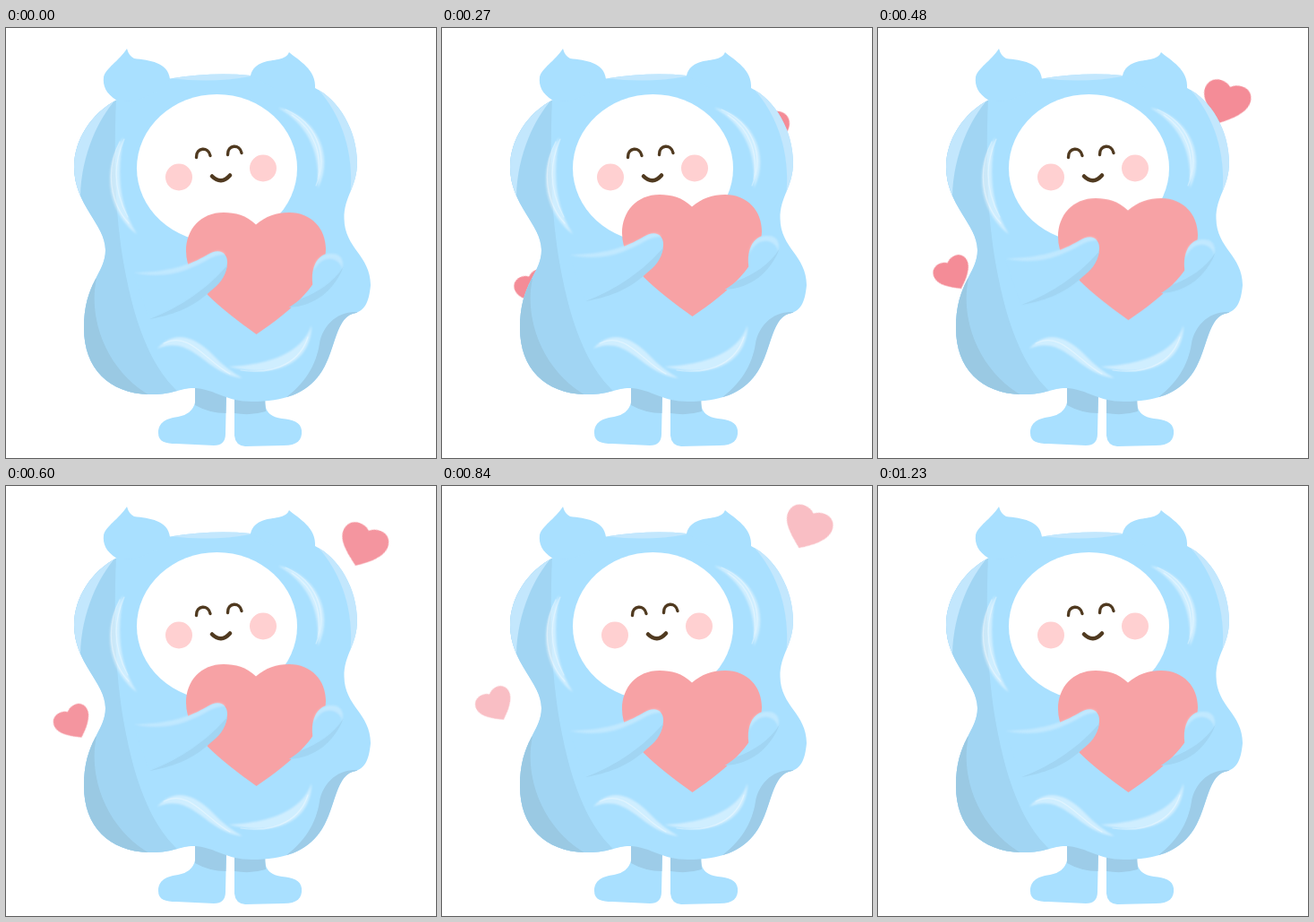
An HTML page for the animation above (1.5 s loop, 480 by 480 pixels).

```html
<!DOCTYPE html>
<html lang="en">
<head>
<meta charset="utf-8">
<title>Hug</title>
<style>
html, body { margin: 0; width: 100%; height: 100%; overflow: hidden; background: #fff; }
svg { display: block; width: 100vw; height: 100vh; }
.hug, .face, .drift { animation: 1500ms linear infinite; }
.drift { fill: #f48c97; }
.hug { animation-name: hug; }
.face { animation-name: face; }
.left { animation-name: left; }
.right { animation-name: right; }
@keyframes hug {
  0%, 46.5%, 100% { transform: translateY(0); }
  10% { transform: translateY(-11px); }
  18% { transform: translateY(-20px); }
  22%, 25% { transform: translateY(-22.5px); }
  32% { transform: translateY(-16px); }
}
@keyframes face {
  0%, 30%, 100% { transform: translateX(0); }
  8%, 22% { transform: translateX(-5px); }
}
@keyframes left {
  0% { transform: translate(144px, 324px) rotate(-22deg); }
  10% { transform: translate(133px, 318px) rotate(-24deg); }
  18% { transform: translate(111px, 307px) rotate(-25deg); }
  32% { transform: translate(93px, 291px) rotate(-28deg); }
  36.7% { opacity: 1; }
  48% { transform: translate(76px, 270.5px) rotate(-29deg); }
  66% { transform: translate(60px, 249px) rotate(-29deg); }
  82%, 100% { transform: translate(52px, 237px) rotate(-29deg); opacity: 0; }
}
@keyframes right {
  0% { transform: translate(322px, 164px) rotate(8deg); }
  10% { transform: translate(334px, 154px) rotate(10deg); }
  18% { transform: translate(355px, 136px) rotate(12deg); }
  32% { transform: translate(381px, 106px) rotate(17deg); }
  36.7% { opacity: 1; }
  40% { transform: translate(390px, 89px) rotate(21deg); }
  48% { transform: translate(396px, 75px) rotate(23deg); }
  66% { transform: translate(401.5px, 62px) rotate(23deg); }
  82%, 100% { transform: translate(403px, 58px) rotate(23deg); opacity: 0; }
}
.blue { fill: #a9e0ff; }
.pale { fill: #c3e7fd; }
.dim { fill: #a1d5f3; }
.dark { fill: #9ac9e3; }
.shade { fill: #9dcce8; }
.blush { fill: #ffd0d1; }
.shine { fill: #fff; opacity: .45; filter: url(#soft); }
.faint { opacity: .28; }
.wisp { fill: none; stroke: #fff; stroke-width: 1.2; stroke-linecap: round; opacity: .35; }
.ink { fill: none; stroke: #503a20; stroke-width: 3.4; stroke-linecap: round; }
.smile { stroke-width: 4.5; }
</style>
</head>
<body>
<svg viewBox="0 0 480 480">
  <defs>
    <filter id="soft" x="-20%" y="-20%" width="140%" height="140%"><feGaussianBlur stdDeviation="1.2"/></filter>
    <path id="heart" d="M279 219.500C268 209 256 206 243 206C217 206 201 225 201 249C201 285 240 313 279.500 342C318 316 357 283 357 247C357 224 341 206 316 206C302 206 290 210 279 219.500Z"/>
    <path id="body" d="M124 80C118 58 160 54 183 56.500Q230 49 273 53C300 45 340 52 345 67C372 80 392 115 392 150C392 178 377 188 377.500 213C378 246 407 254 407 287C405 308 400 316 387 319C367 325 367 365 350 387C335 408 310 417 275 417C245 417 235 404 212 402C195 401 185 410 160 409C115 408 87 380 87 335C87 284 111 274 111 248C111 219 76 198 76 155C76 125 95 95 124 80Z"/>
    <clipPath id="inside"><use href="#body"/></clipPath>
  </defs>

  <g class="drift left"><use href="#heart" transform="scale(.265) translate(-279.500 -342)"/></g>
  <g class="drift right"><use href="#heart" transform="scale(.34) translate(-279.500 -342)"/></g>

  <g class="blue">
    <path d="M211 398V418Q208 431 192 434C175 436 170 443 170 452C170 462 178 464 190 464L232 466Q245 466 245 453L246 408Z"/>
    <path d="M255 410V455Q256 466 267 467L310 466C325 466 331 460 330 449C329 440 320 437 308 436Q291 434 289 420V410Z"/>
  </g>
  <path class="shade" d="M211 398V421Q227 430 245.500 430L246 408ZM255 410V430Q274 433 290 428L289 410Z"/>

  <use href="#body" class="blue"/>
  <g clip-path="url(#inside)">
    <path class="dim" d="M123 78C119 180 124 250 146 325C158 362 172 387 192 406L160 420L60 400V60Z"/>
    <path class="pale" d="M124 78C104 100 84 140 83 188L60 190V70Z"/>
    <path class="pale" d="M345 65C372 92 392 140 383 194L410 180V60Z"/>
    <path class="pale" d="M183 56Q230 62 273 54V40H183Z"/>
    <path class="dark" d="M101 280C91 325 113 385 164 412L70 420V280Z"/>
    <path class="shade" d="M392 317C368 316 353 334 350 352C346 377 334 397 308 416L400 420Z"/>
  </g>
  <g class="blue">
    <path d="M124 81C111 73 108 64 109 55C111 45 126 37 135 23Q137 31 143 34C160 36 181 38 183 57Q170 75 140 82Z"/>
    <path d="M273 53C277 37 294 37 304 35Q314 33 316 27C326 36 347 46 345 68L300 68Z"/>
  </g>

  <g class="shine">
    <path d="M131 122C106 157 113 205 146 230C127 200 123 165 131 122Z"/>
    <path d="M304 89C344 97 368 140 348 179C351 145 341 110 304 89Z"/>
    <path d="M169 358C190 334 214 347 232 366Q246 381 264 391C240 388 226 373 212 364C196 353 184 352 169 358Z"/>
    <path d="M248 378C295 376 331 362 341 332C341 367 312 394 248 378Z"/>
  </g>
  <g class="wisp">
    <path d="M127 127C110 160 117 196 137 218M132 124C118 155 122 185 136 211"/>
    <path d="M312 91C345 105 361 140 346 176M319 97C345 114 353 142 348 169"/>
    <path d="M176 352C205 338 222 371 250 386M262 382C304 388 329 370 337 345"/>
  </g>

  <ellipse cx="235.500" cy="156.500" rx="89.500" ry="82.500" fill="#fff"/>
  <g class="face">
    <circle class="blush" cx="193" cy="166.500" r="15"/>
    <circle class="blush" cx="287" cy="156.500" r="15"/>
    <path class="ink" d="M212.500 144.500C212 133 226 132 228 142.500M247.500 141.500C247 130 261 129 263 139.500"/>
    <path class="ink smile" d="M230 165.500Q240 175.500 250 164.500"/>
  </g>

  <g class="hug">
    <use href="#heart" fill="#f7a2a5"/>
    <path class="blue" d="M142 274C180 274 205 265 225 253C237 245 248 250 247 263C246 275 238 285 228 293C212 307 190 320 160 325Z"/>
    <path class="dim" d="M160 325C195 312 226 290 247 265C245 279 237 287 228 294C208 313 184 321 160 325Z"/>
    <path class="shine faint" d="M142 273C182 273 205 264 226 253C234 247 242 248 245 253C232 252 224 261 206 268C186 277 162 278 142 273Z"/>
    <path class="blue" d="M343 290C339 270 346 252 363 251C377 251 380 262 375 272C362 298 340 311 316 312C328 306 338 300 343 290Z"/>
    <path class="dim" d="M377 266C366 284 348 295 330 302L316 312C345 311 367 292 377 266Z"/>
    <path class="shine faint" d="M343 272C343 259 353 251 364 252C374 252 378 260 375 270C375 258 354 249 343 272Z"/>
  </g>
</svg>
</body>
</html>
```
